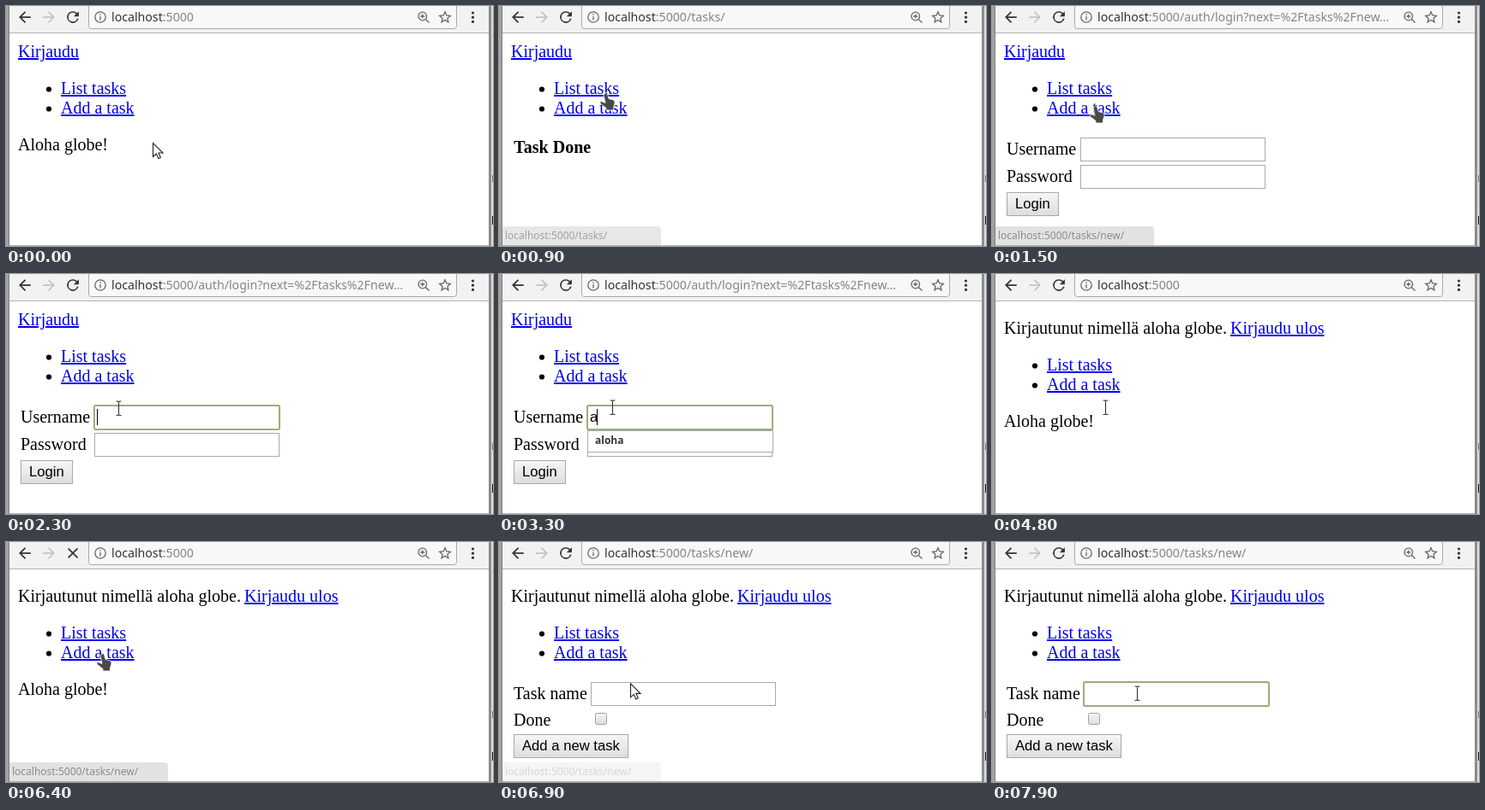
An HTML page for the animation above (8000 ms loop, 568 by 281 pixels).

```html
<!DOCTYPE html>
<html lang="en">
<head>
<meta charset="utf-8">
<title>Task list demo</title>
<style>
html, body { margin: 0; width: 100%; height: 100%; overflow: hidden; background: #fff; }
svg { display: block; width: 568px; height: 281px; }
text { white-space: pre; }
.page { font: 20px "Liberation Serif", serif; }
.link { fill: #0000ee; text-decoration: underline; }
.bold { font-weight: bold; }
.field { font: 16.67px "Liberation Sans", sans-serif; }
.url { font: 14.15px "Noto Sans", sans-serif; }
.status { font: 12px "Noto Sans", sans-serif; fill: #8c8c8c; }
.hint { font: bold 12px "Noto Sans", sans-serif; fill: #333; }
</style>
</head>
<body>
<svg viewBox="0 0 568 281">
  <defs>
    <linearGradient id="btn" x2="0" y2="1"><stop stop-color="#f6f6f6"/><stop offset="1" stop-color="#dddddd"/></linearGradient>
    <path id="back" d="M20 11H7.83l5.59-5.59L12 4l-8 8 8 8 1.41-1.41L7.83 13H20z"/>
    <path id="reload" d="M17.65 6.35A8 8 0 1 0 19.73 14h-2.08A6 6 0 1 1 12 6c1.66 0 3.14.69 4.22 1.78L13 11h7V4z"/>
    <path id="stop" d="M19 6.4 17.6 5 12 10.6 6.4 5 5 6.4 10.6 12 5 17.6 6.4 19 12 13.4 17.6 19 19 17.6 13.4 12z"/>
    <path id="arrow" d="M.5 .5V16.5L4.3 13 6.8 18.6 9.3 17.5 6.9 12H12z" fill="#fff" stroke="#222" stroke-width="1.1"/>
    <path id="hand" d="M-.5 .5Q1-1.5 2.5 .5L4 6.5 9.5 8Q11.5 9 11 12L9.5 16.5V20H1V17.5L-5.5 12.5Q-7 10.5-5 9.5L0 11.5-1.8 3Q-2 1-.5 .5z" fill="#4b4848" stroke="#fff" stroke-width=".8"/>
    <path id="beam" d="M-2.5-8H-.5L.5-7 1.5-8H3.5M-2.5 8.5H-.5L.5 7.5 1.5 8.5H3.5M.5-7V8" fill="none" stroke="#333" stroke-width="1.1"/>
  </defs>
  <rect width="568" height="281" fill="#fff"/>
  <rect width="568" height="31" fill="#f2f2f2"/>
  <path d="M0 31.5H568" stroke="#b6b4b6"/>
  <rect x="96.5" y="-6" width="429" height="32.5" rx="3" fill="#f8f8f8" stroke="#a9a9a9"/>
  <use href="#back" transform="translate(11.6 2.8) scale(.86)" fill="#333"/>
  <use href="#back" transform="translate(60.4 2.8) scale(-.86 .86)" fill="#c4c4c4"/>
  <g fill="none" stroke="#666" stroke-width="1.3">
    <circle cx="110" cy="13" r="6.2"/><path d="M110 12V16.5M110 9.3V10.8"/>
    <circle cx="485.8" cy="12" r="4.8"/><path d="M489.3 15.5 493.5 19.5M483.3 12H488.3M485.8 9.5V14.5"/>
    <path d="M512 6.8 513.8 11 518.3 11.4 514.9 14.4 515.9 18.8 512 16.5 508.1 18.8 509.1 14.4 505.7 11.4 510.2 11z"/>
  </g>
  <g fill="#333"><circle cx="544.5" cy="8" r="1.6"/><circle cx="544.5" cy="13.2" r="1.6"/><circle cx="544.5" cy="18.4" r="1.6"/></g>
  <g id="view"></g>
  <path d="M3 280.5H563" stroke="#b0b0b0"/>
  <rect width="3" height="281" fill="#a2a2a2"/><path d="M3.5 0V281" stroke="#7c7c7c"/>
  <rect x="563" width="3" height="281" fill="#8c8c8c"/><rect x="566" width="2" height="281" fill="#dedede"/>
  <path d="M567.5 198V206" stroke="#777"/><path d="M567.5 246V256" stroke="#111"/>
</svg>
<script>
const USER = 'aloha', NAME = 'aloha globe', HOST = 'localhost:5000';
const view = document.getElementById('view');

const text = (x, y, s, cls = 'page') => `<text x="${x}" y="${y}" class="${cls}">${s}</text>`;
const link = (x, y, s) => text(x, y, s, 'page link');
const caret = (x, y) => `<path d="M${x + .5} ${y}v19" stroke="#000"/>`;
const clamp = v => Math.max(0, Math.min(1, v));

// mouse path: time, x, y, shape used from that time on
const mouse = [
  [0, 171, 160, 'arrow'], [400, 137, 108, 'hand'], [600, 124, 102, 'hand'], [1000, 124, 102, 'hand'],
  [1200, 120, 117, 'hand'], [1600, 120, 117, 'hand'], [1800, 125, 135, 'arrow'], [2100, 131, 157, 'beam'],
  [2300, 131, 157, 'beam'], [2500, 132, 156, 'beam'], [5700, 132, 156, 'beam'], [5800, 129, 152, 'arrow'],
  [6000, 120, 140, 'hand'], [6200, 112, 131, 'hand'], [6600, 112, 131, 'hand'], [6700, 121, 142, 'arrow'],
  [7000, 169, 177, 'beam'], [8000, 169, 177, 'beam']
];

function cursor(t) {
  const i = mouse.findIndex(k => k[0] > t), [t0, x0, y0, shape] = mouse[i - 1], [t1, x1, y1] = mouse[i];
  const p = (t - t0) / (t1 - t0);
  return `<use href="#${shape}" x="${x0 + (x1 - x0) * p}" y="${y0 + (y1 - y0) * p}"/>`;
}

function input(x, y, focus) {
  const box = `<rect x="${x + .5}" y="${y + .5}" width="215" height="27" fill="#fff" stroke="#a9a9a9"/>`;
  return box + `<rect x="${x}" y="${y}" width="216" height="28" rx="1.5" fill="none" stroke="#98af7b" stroke-width="2" opacity="${focus}"/>`;
}

const button = (y, w, s) =>
  `<rect x="17.5" y="${y + .5}" width="${w}" height="27" fill="url(#btn)" stroke="#a9a9a9"/>` + text(27, y + 19, s, 'field');

function nav(y) {
  const dot = cy => `<circle cx="50" cy="${cy}" r="3.1"/>`;
  return dot(y - 5.5) + dot(y + 17.5) + link(64, y, 'List tasks') + link(64, y + 23, 'Add a task');
}

function loginForm(t) {
  const onPass = t >= 4000, typed = clamp((t - 3200) / 500) * 5, dots = clamp((t - 4100) / 500) * 5;
  let s = text(17, 174, 'Username') + text(17, 206, 'Password') + button(218, 60, 'Login')
    + input(103, 154, t >= 2300 && !onPass ? 1 : 0) + input(103, 186, onPass ? 1 : 0)
    + text(106, 173, USER.slice(0, Math.round(typed)), 'field')
    + text(106, 206, '•'.repeat(Math.round(dots)), 'field');
  if (onPass) s += caret(106 + Math.round(dots) * 5.83, 190);
  else if (t >= 2300 && t < 2800) s += caret(106, 158);
  else if (t >= 3300) s += caret(106 + Math.round(typed * 8.15), 158);
  if (t >= 3300 && t < 4200) {
    const fade = clamp((t - 3900) / 200), inset = 3 * fade;
    s += `<g opacity="${1 - .66 * fade}"><rect x="${103.5 + inset}" y="${183.5 - fade}" width="${216 - 2 * inset}" height="25" fill="#fff" stroke="#aaa"/>`
      + text(112 + inset, 199, USER, 'hint') + '</g>';
  }
  return s;
}

function newTaskForm(t) {
  return text(17, 184, 'Task name') + input(107, 164, clamp((t - 7200) / 200))
    + text(17, 215, 'Done')
    + '<rect x="112.5" y="200.5" width="13" height="13" rx="2" fill="url(#btn)" stroke="#a0a0a0"/>'
    + button(225, 133, 'Add a new task')
    + (t >= 7400 && t < 7900 ? caret(110, 168) : '');
}

function statusBar(t) {
  const early = t < 3000;
  const alpha = early ? clamp((t - 700) / 250) * clamp((2100 - t) / 300) : t >= 6400 ? clamp((7000 - t) / 300) : 0;
  if (!alpha) return '';
  return `<g opacity="${alpha}"><path d="M4 258H185Q189 258 189 262V281H4z" fill="#e2e2e2"/>`
    + text(7, 273, HOST + (t < 1200 ? '/tasks/' : '/tasks/new/'), 'status') + '</g>';
}

function draw(t) {
  const loggedIn = t >= 4800, top = loggedIn ? 10 : 0;
  const page = t < 800 ? 'home' : t < 1400 ? 'tasks' : t < 4800 ? 'login' : t < 6600 ? 'home' : 'new';
  const path = { home: '', tasks: '/tasks/', login: '/auth/login?next=%2Ftasks%2Fnew…', new: '/tasks/new/' }[page];
  const loading = [700, 1300, 4700, 6400, 6500].includes(t);

  let s = `<use href="#${loading ? 'stop' : 'reload'}" transform="translate(67.7 2.7) scale(.86)" fill="#333"/>`
    + text(123, 18, `<tspan fill="#333">localhost</tspan><tspan fill="#858585">:5000${path}</tspan>`, 'url');
  s += loggedIn
    ? text(14, 70, `Kirjautunut nimellä ${NAME}.`) + link(278, 70, 'Kirjaudu ulos')
    : link(14, 60, 'Kirjaudu');
  s += nav(103 + top);
  if (page === 'home') s += text(14, 169 + top, 'Aloha globe!');
  if (page === 'tasks') s += text(17.3, 172, 'Task Done', 'page bold');
  if (page === 'login') s += loginForm(t);
  if (page === 'new') s += newTaskForm(t);
  view.innerHTML = s + statusBar(t) + cursor(t);
}

let last = -1;
function tick() {
  const t = Math.floor(performance.now() % 8000 / 100) * 100;
  if (t !== last) draw(last = t);
  requestAnimationFrame(tick);
}
tick();
</script>
</body>
</html>
```
